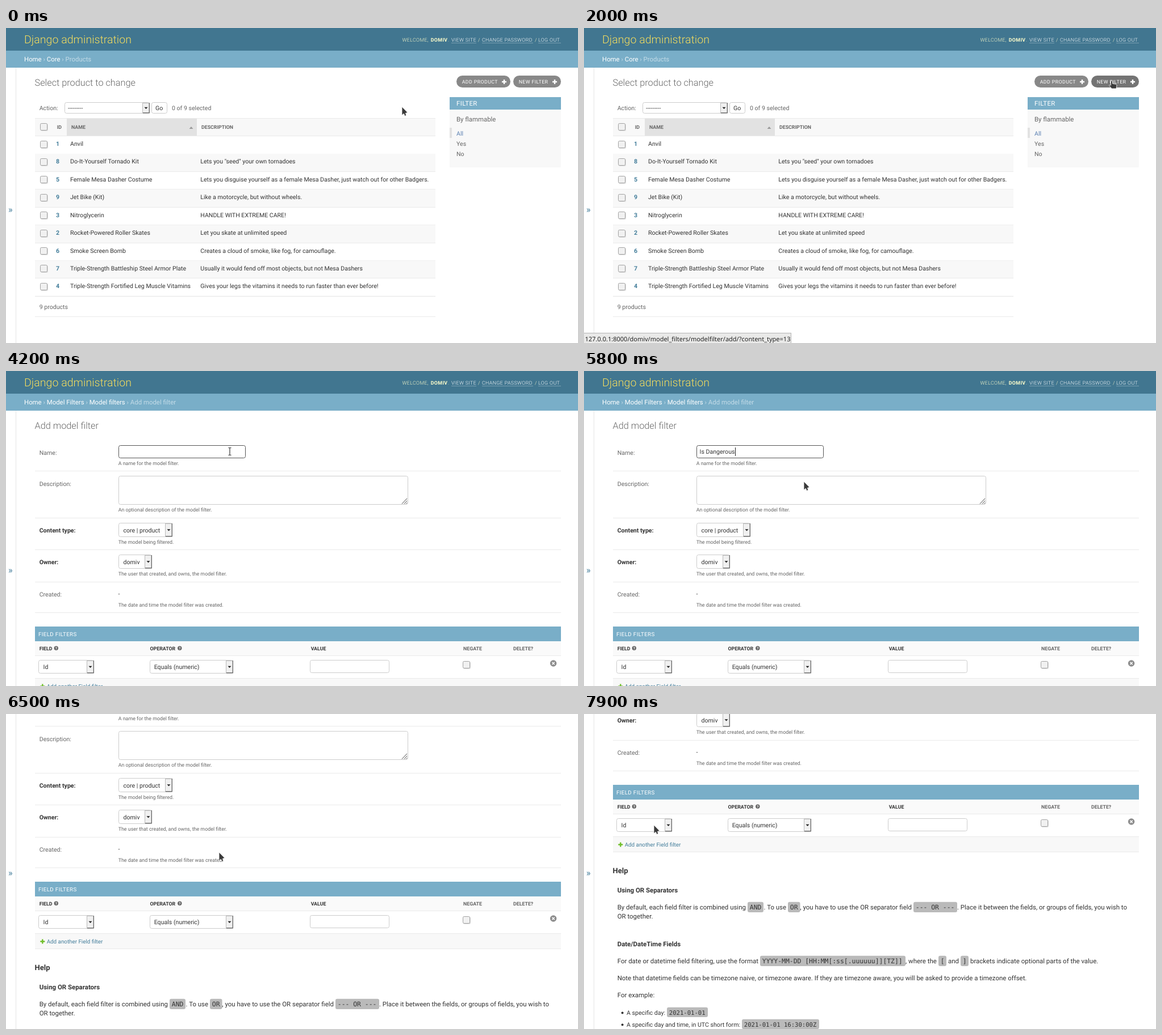
Write an HTML page that moves like this. It is 1007x556 px and loops after 8 s.

```html
<!DOCTYPE html>
<html lang="en">
<head>
<meta charset="utf-8">
<title>Django administration</title>
<style>
html, body { margin: 0; width: 100%; height: 100%; overflow: hidden; background: #fff; }
svg { position: absolute; left: 0; top: 0; display: block; }
text { font-family: Roboto, sans-serif; font-size: 10.6px; fill: #333; white-space: pre; text-rendering: geometricPrecision; }
.b { font-weight: 700; }
.lt { font-weight: 300; }
.g { fill: #666; }
.w { fill: #fff; }
.link { fill: #447e9b; }
.pale { fill: #c4dce8; }
.crumb { font-size: 11.4px; }
.para { font-size: 11.44px; }
.help { font-size: 8.9px; fill: #666; }
.th { font-size: 8.8px; font-weight: 700; }
.caps { font-size: 8.8px; letter-spacing: .4px; }
.title { font-size: 16.3px; font-weight: 300; fill: #666; }
.code { font-family: "DejaVu Sans Mono", monospace; }
.tip { font-family: "Noto Sans", "Open Sans", sans-serif; font-size: 11px; fill: #222; }
</style>
</head>
<body>
<svg id="stage" width="1007" height="556" viewBox="0 0 1007 556"></svg>
<script>
const NS = 'http://www.w3.org/2000/svg';
const stage = document.getElementById('stage');
const USER = 'domiv';
let layer = stage;

function el(tag, attrs) {
  const n = document.createElementNS(NS, tag);
  for (const k in attrs) n.setAttribute(k, attrs[k]);
  return layer.appendChild(n);
}
function group(draw, parent = stage) {
  const before = layer;
  layer = parent;
  const g = el('g', {});
  layer = g;
  draw();
  layer = before;
  return g;
}
const rect = (x, y, w, h, fill, more) => el('rect', { x, y, width: w, height: h, fill, ...more });
const box = (x, y, w, h, stroke = '#ccc', r = 3, fill = '#fff') =>
  rect(x + .5, y + .5, w - 1, h - 1, fill, { stroke, rx: r });
const path = (d, fill, more) => el('path', { d, fill, ...more });
const rule = (x, y, w, c = '#eaeaea') => rect(x, y, w, 1, c);
function text(x, y, str, cls = '') {
  const n = el('text', { x, y, class: cls });
  n.textContent = str;
  return n;
}
function plus(x, y, size, color, width) {
  const h = size / 2;
  path(`M${x - h} ${y}h${size}M${x} ${y - h}v${size}`, 'none', { stroke: color, 'stroke-width': width });
}
function check(x, y) {
  rect(x + 1, y + 1, 13, 13, '#ddd', { rx: 2.5 });
  box(x, y, 13, 13, '#a2a2a2', 2, '#f1f1f1');
}
function select(x, y, w, h, label, pad = 8.5) {
  box(x, y, w, h);
  text(x + pad, y + h / 2 + 4, label);
  const bx = x + w - 13;
  rect(bx + .5, y + 1.5, 12, h - 3, '#f0f0f0', { stroke: '#bbb' });
  path(`M${bx + 12.3} ${y + 1}V${y + h - 1.2}H${bx + 1}`, 'none', { stroke: '#666', 'stroke-width': 1.3 });
  path(`M${bx + 3.5} ${y + h / 2 - 1.3}h6l-3 3.2z`, '#222');
}
function pill(x, w, label) {
  const n = rect(x, 84, w, 21, '#888', { rx: 10.5 });
  text(x + 9.7, 98, label, 'caps w');
  plus(x + w - 11, 95, 8, '#fff', 2.4);
  return n;
}
function code(x, y, w, str, size = 11.4) {
  rect(x, y - 13.3, w, size + 6.8, '#bababa', { rx: 3 });
  text(x + 3.8, y, str, 'code').style.fontSize = size + 'px';
}
function chrome(crumbs, arrowY) {
  rect(17, 70, 1, 950, '#e6e6e6');
  const arrow = text(4, arrowY, '»', 'link');
  arrow.style.fontSize = '16.3px';
  rect(0, 0, 1007, 40, '#417690');
  const h = text(32, 26.7, 'Django administration', 'lt');
  h.style.cssText = 'font-size:19.6px;fill:#f5dd5d';
  const tool = (x, s, cls, fill) => { text(x, 24, s, 'caps ' + cls).style.fill = fill; };
  tool(697.5, 'WELCOME,', 'lt', '#ffc');
  tool(747.7, USER.toUpperCase(), 'b', '#ffc');
  tool(778, '.', 'lt', '#ffc');
  tool(831, '/', 'lt', '#ffc');
  tool(931, '/', 'lt', '#ffc');
  for (const [x, w, s] of [[784, 44, 'VIEW SITE'], [838, 90, 'CHANGE PASSWORD'], [937, 40, 'LOG OUT']]) {
    tool(x, s, 'lt', '#fff');
    rect(x, 26, w, 1, '#fff', { opacity: .3 });
  }
  rect(0, 40, 1007, 30, '#79aec8');
  const line = text(32, 59, '', 'crumb pale');
  crumbs.forEach((c, i) => {
    const last = i === crumbs.length - 1;
    const span = document.createElementNS(NS, 'tspan');
    span.textContent = c;
    if (!last) span.setAttribute('class', 'w');
    line.append(span);
    if (!last) line.append(' › ');
  });
  return arrow;
}

const products = [
  [1, 'Anvil', ''],
  [8, 'Do-It-Yourself Tornado Kit', 'Lets you "seed" your own tornadoes'],
  [5, 'Female Mesa Dasher Costume', 'Lets you disguise yourself as a female Mesa Dasher, just watch out for other Badgers.'],
  [9, 'Jet Bike (Kit)', 'Like a motorcycle, but without wheels.'],
  [3, 'Nitroglycerin', 'HANDLE WITH EXTREME CARE!'],
  [2, 'Rocket-Powered Roller Skates', 'Let you skate at unlimited speed'],
  [6, 'Smoke Screen Bomb', 'Creates a cloud of smoke, like fog, for camouflage.'],
  [7, 'Triple-Strength Battleship Steel Armor Plate', 'Usually it would fend off most objects, but not Mesa Dashers'],
  [4, 'Triple-Strength Fortified Leg Muscle Vitamins', 'Gives your legs the vitamins it needs to run faster than ever before!']
];

let newFilter;
const listPage = group(() => {
  chrome(['Home', 'Core', 'Products'], 325.5);
  text(50.5, 102, 'Select product to change', 'title');
  pill(793, 95, 'ADD PRODUCT');
  newFilter = pill(893, 84, 'NEW FILTER');

  text(58.7, 145, 'Action:', 'g');
  select(103, 131, 150, 20, '---------', 6);
  box(256, 131, 28, 20);
  text(263, 145, 'Go');
  text(292, 145, '0 of 9 selected', 'g');

  rect(51, 159, 705, 32, '#f8f8f8');
  rect(107, 160, 229, 30, '#e2e2e2');
  rule(51, 159, 705);
  rule(51, 190, 705);
  check(60, 168);
  text(89.7, 178, 'ID', 'th g');
  text(115, 178, 'NAME', 'th g');
  text(344, 178, 'DESCRIPTION', 'th g');
  path('M322.5 178h7l-3.5-4z', '#999');
  products.forEach(([id, name, desc], i) => {
    const y = 190.5 + i * 31.42, base = y + 17.5;
    if (i % 2) rect(51, y, 705, 31.4, '#f8f8f8');
    rule(51, Math.round(y + 31), 705);
    check(60, Math.round(y + 8));
    text(88, base, id, 'b link');
    text(113, base, name);
    text(342.3, base, desc);
  });
  rule(51, 473, 705, '#e4e4e4');
  text(58.7, 496, '9 products', 'g');
  rule(51, 509, 705);

  rect(781, 122, 196, 124, '#f8f8f8');
  rect(781, 122, 196, 22, '#79aec8');
  const f = text(793, 137, 'FILTER', 'crumb w');
  f.style.letterSpacing = '.4px';
  text(793, 165, 'By flammable', 'crumb g');
  rect(781, 176, 4, 18, '#e2e2e2');
  text(793, 189.5, 'All').style.fill = '#5b80b2';
  text(793, 207.5, 'Yes', 'g');
  text(793, 225.5, 'No', 'g');
});

let sideArrow, nameValue, caret;
const formPage = group(() => {
  sideArrow = chrome(['Home', 'Model Filters', 'Model filters', 'Add model filter'], 357);
  text(50.5, 102, 'Add model filter', 'title');

  const field = (label, cls, y, help, helpY, end) => {
    text(58.7, y, label, cls);
    text(197.7, helpY, help, 'help');
    rule(51, end, 926);
  };
  field('Name:', 'g', 148, 'A name for the model filter.', 166, 176);
  field('Description:', 'g', 203, 'An optional description of the model filter.', 248, 259);
  field('Content type:', 'b', 285, 'The model being filtered.', 305, 315);
  field('Owner:', 'b', 341, 'The user that created, and owns, the model filter.', 361, 372);
  field('Created:', 'g', 398, 'The date and time the model filter was created.', 416, 426);
  box(198, 131, 224, 23, '#555');
  nameValue = text(203.5, 146, 'Is Dangerous');
  caret = rect(203, 135, 1, 15, '#222');
  box(198, 185, 510, 51);
  path('M697 234.5l9-9.5M701 234.5l5-5.5M704.3 234.5l2-2', 'none', { stroke: '#444' });
  select(198, 268, 95, 25, 'core | product');
  select(198, 324, 59, 25, USER);
  text(197.5, 397, '-');

  rect(51, 451, 926, 26, '#79aec8');
  const h = text(57, 468, 'FIELD FILTERS', 'w');
  h.style.cssText = 'font-size:9.7px;letter-spacing:.4px';
  rect(51, 477, 926, 26, '#fafafa');
  rule(51, 502, 926);
  text(58.7, 493, 'FIELD', 'th');
  text(253.5, 493, 'OPERATOR', 'th');
  text(536.7, 493, 'VALUE', 'th');
  text(805, 493, 'NEGATE', 'th g');
  text(893, 493, 'DELETE?', 'th g');
  for (const x of [88.3, 305.8]) {
    el('circle', { cx: x, cy: 489.3, r: 3.7, fill: '#666' });
    const q = text(x, 491.6, '?', 'b w');
    q.style.cssText = 'font-size:6.5px;text-anchor:middle';
  }
  select(57, 510, 98, 24, 'Id');
  select(253, 510, 147, 24, 'Equals (numeric)', 7.7);
  box(535, 510, 140, 23);
  check(804, 512);
  el('circle', { cx: 963.6, cy: 516, r: 5.7, fill: '#8c8c8c' });
  path('M961.4 513.8l4.4 4.4m0-4.4l-4.4 4.4', 'none', { stroke: '#fff', 'stroke-width': 1.5 });
  rect(51, 542, 926, 28, '#f8f8f8');
  rule(51, 542, 926);
  rule(51, 569, 926);
  plus(64.3, 556.5, 8, '#70bf2b', 2.4);
  text(71.7, 560.2, 'Add another Field filter', 'link').style.fontSize = '9.8px';

  text(50.5, 606.5, 'Help', 'b').style.fontSize = '13px';
  text(58.7, 641, 'Using OR Separators', 'para b');
  const run = (y, parts) => parts.forEach(([x, s, w]) => w ? code(x, y, w, s) : text(x, y, s, 'para'));
  run(671, [
    [58.7, 'By default, each field filter is combined using'], [288, 'AND', 28],
    [316.5, '. To use'], [359, 'OR', 21.5],
    [380.3, ', you have to use the OR separator field'], [580, '--- OR ---', 77],
    [657, '. Place it between the fields, or groups of fields, you wish to']
  ]);
  text(58.7, 687, 'OR together.', 'para');
  text(58.7, 736, 'Date/DateTime Fields', 'para b');
  run(766, [
    [58.7, 'For date or datetime field filtering, use the format'],
    [310, 'YYYY-MM-DD [HH:MM[:ss[.uuuuuu]][TZ]]', 256],
    [566, ', where the'], [624, '[', 14], [641, 'and'], [663, ']', 14],
    [680, 'brackets indicate optional parts of the value.']
  ]);
  text(58.7, 796, 'Note that datetime fields can be timezone naive, or timezone aware. If they are timezone aware, you will be asked to provide a timezone offset.', 'para');
  text(58.7, 826, 'For example:', 'para');
  const item = (y, s, x, w, c) => {
    el('circle', { cx: 67.6, cy: y - 3.6, r: 2, fill: '#333' });
    text(75, y, s);
    code(x, y, w, c, 10.6);
  };
  item(857, 'A specific day:', 146, 72, '2021-01-01');
  item(878, 'A specific day and time, in UTC short form:', 278, 136, '2021-01-01 16:30:00Z');
});

let tipBox, tipText;
const tip = group(() => {
  tipBox = rect(-.5, 538.5, 365, 18, '#e9e9e8', { stroke: '#b4b4b4' });
  tipText = text(1.7, 553, '', 'tip');
});
const tips = [
  [1600, 365, `127.0.0.1:8000/${USER}/model_filters/modelfilter/add/?content_type=13`],
  [2300, 126, 'Waiting for 127.0.0.1…']
];

const outline = { stroke: '#fff', 'stroke-width': .8, 'stroke-linejoin': 'round' };
const shapes = {
  arrow: group(() => path('M0 0V15L3.4 12.2L5 16.4L7.8 15.2L6.4 11.4L10 10.2Z', '#3a3a3a', outline)),
  hand: group(() => path('M-1.5 .8Q0-.8 1.5.8V5.2L7.5 6.4Q9.3 7 9 9L8 14H0L-4.3 8.8Q-4.5 7-2.8 7.3L-1.5 8.3Z', '#3a3a3a', outline)),
  beam: group(() => path('M-2.5-6.5H-.8L0-6L.8-6.5H2.5M0-6V6M-2.5 6.5H-.8L0 6L.8 6.5H2.5', 'none', { stroke: '#333', 'stroke-width': 1.2 }))
};

// [time, x, y]
const pointer = [
  [0, 697, 139], [500, 697, 139], [700, 712, 138], [1000, 785, 124], [1400, 881, 101],
  [1500, 898, 98], [1700, 920, 95], [2000, 929, 93], [2790, 929, 93], [2800, 926, 92],
  [3100, 926, 92], [3300, 880, 96], [3600, 680, 120], [3900, 470, 143], [4000, 433, 146],
  [4100, 408, 144], [4200, 394, 142], [5500, 394, 142], [5600, 393, 148], [5700, 389, 176],
  [5900, 384, 213], [6100, 383, 217], [6500, 375, 244], [6900, 365, 252], [7300, 315, 245],
  [7500, 255, 236], [7700, 165, 211], [7900, 123, 196]
];
const kinds = [[0, 'arrow'], [1500, 'hand'], [2800, 'arrow'], [4100, 'beam'], [5700, 'arrow']];
const scroll = [
  [5800, 0], [5900, 11], [6100, 62], [6500, 155], [6900, 263], [7100, 305], [7300, 326]
];

function track(keys, t, i) {
  if (t <= keys[0][0]) return keys[0][i];
  const k = keys.findIndex(key => key[0] > t);
  if (k < 0) return keys[keys.length - 1][i];
  const a = keys[k - 1], b = keys[k];
  return a[i] + (b[i] - a[i]) * (t - a[0]) / (b[0] - a[0]);
}
const current = (keys, t) => keys.filter(k => k[0] <= t).pop();
const show = (n, on) => n.setAttribute('display', on ? 'inline' : 'none');
const move = (n, x, y) => n.setAttribute('transform', `translate(${x} ${y})`);

function render(ms) {
  const t = Math.floor(ms / 100) * 100;
  const form = t >= 2800, typed = t >= 4700;
  show(listPage, !form);
  show(formPage, form);
  newFilter.setAttribute('fill', t >= 1500 ? '#747474' : '#888');

  const y = Math.round(track(scroll, t, 1));
  move(formPage, 0, -y);
  move(sideArrow, 0, Math.max(0, y - 71));
  show(nameValue, typed);
  show(caret, t < 3300 || (typed && t < 4900) || t >= 5600);
  caret.setAttribute('x', typed ? 266 : 203);

  const msg = current(tips, t);
  show(tip, msg && !form);
  if (msg) {
    tipBox.setAttribute('width', msg[1]);
    if (tipText.textContent !== msg[2]) tipText.textContent = msg[2];
  }

  const kind = current(kinds, t)[1];
  for (const k in shapes) {
    show(shapes[k], k === kind);
    move(shapes[k], Math.round(track(pointer, t, 1)), Math.round(track(pointer, t, 2)));
  }
}

const start = performance.now();
function tick() {
  render((performance.now() - start) % 8000);
  requestAnimationFrame(tick);
}
tick();
</script>
</body>
</html>
```
